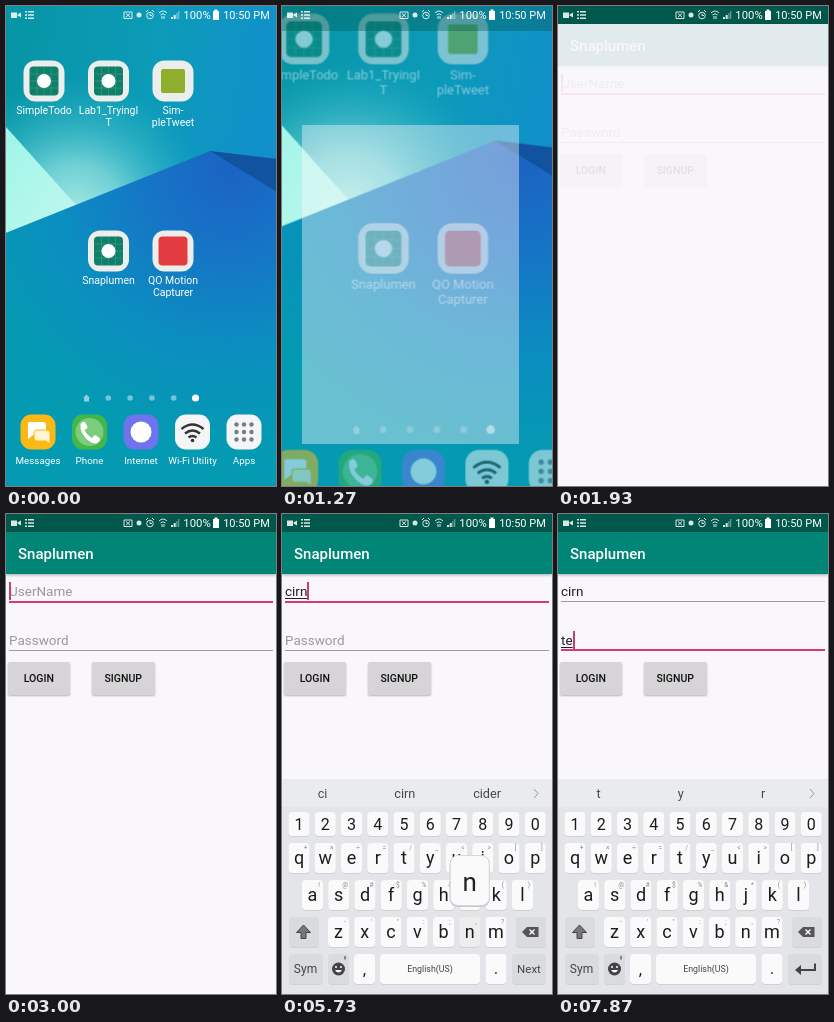
These frames come from a looping animation (270 px wide and 480 px high, 8 s). An HTML page:

```html
<!DOCTYPE html>
<html lang="en">
<head>
<meta charset="utf-8">
<title>Login</title>
<style>
html, body { margin: 0; width: 100%; height: 100%; overflow: hidden; }
#stage { position: relative; width: 270px; height: 480px; overflow: hidden; background: #0a95b2; font-family: Roboto, sans-serif; }
#stage > * { position: absolute; }
svg { left: 0; top: 0; width: 270px; height: 480px; display: block; }
svg text { text-anchor: middle; }
#wall, #icons { transform-origin: 107px 256px; animation: wall 8s linear infinite; }
#icons { animation-name: icons; }
@keyframes wall {
  0%, 12% { transform: none; }
  14.125% { transform: scale(1.02); }
  17.5% { transform: scale(1.16); }
  20%, 100% { transform: scale(1.24); }
}
@keyframes icons {
  0%, 11.4% { transform: none; opacity: 1; animation-timing-function: ease-in; }
  14.125% { transform: scale(1.058); opacity: .86; }
  17.5% { transform: scale(1.39); opacity: .18; }
  20%, 100% { transform: scale(1.56); opacity: 0; }
}
#win { background: #f9f7fa; animation: win 8s linear infinite; }
@keyframes win {
  0%, 13.3% { left: 60px; top: 225px; width: 90px; height: 90px; opacity: 0; }
  14.125% { left: 38px; top: 222px; width: 169px; height: 178px; opacity: .03; }
  17.5% { left: 3px; top: 25px; width: 262px; height: 448px; opacity: .75; }
  20.5%, 100% { left: 0; top: 18px; width: 270px; height: 462px; opacity: 1; }
}
#strip { left: 0; top: 0; width: 270px; background: #00574b; animation: strip 8s linear infinite; }
@keyframes strip {
  0%, 14.125% { height: 25px; opacity: 0; }
  17.5% { height: 25px; opacity: .7; }
  20.5%, 100% { height: 18px; opacity: 1; }
}
#form { left: 0; top: 0; width: 270px; height: 480px; animation: form 8s linear infinite; }
@keyframes form { 0%, 23.8% { opacity: 0; } 27.3%, 100% { opacity: 1; } }
#form > * { position: absolute; white-space: pre; }
#bar { left: 0; top: 18px; width: 258px; height: 42px; padding-left: 12px; background: #008577; color: #fff; font: 500 15px/44px Roboto, sans-serif; box-shadow: 0 1px 3px #0005; }
.field { left: 3px; font-size: 13.5px; line-height: 20px; color: #222; }
.hint { color: #9a989b; }
.line { left: 3px; width: 264px; height: 1px; background: #9b999c; }
.focus { height: 2px; background: #d63a72; }
.field u { text-underline-offset: 2px; text-decoration-thickness: 1px; }
.cur { display: inline-block; width: 2px; height: 18px; background: #c04272; vertical-align: -4px; }
.btn { top: 148px; width: 62.5px; height: 33px; border-radius: 2px; background: #d6d4d7; box-shadow: 0 1px 2px #0004; text-align: center; font: 500 10.5px/34px Roboto, sans-serif; color: #111; }
#keys { animation: keys 8s infinite; }
@keyframes keys {
  0%, 40% { transform: translateY(217px); animation-timing-function: cubic-bezier(.1, .6, .3, 1); }
  46.2%, 100% { transform: none; }
}
</style>
</head>
<body>
<div id="stage">
  <svg id="home" viewBox="0 0 270 480">
    <defs>
      <linearGradient id="sky" gradientUnits="userSpaceOnUse" x1="20" y1="60" x2="270" y2="100"><stop stop-color="#0796a8"/><stop offset=".5" stop-color="#0c9bb8"/><stop offset="1" stop-color="#1190cc"/></linearGradient>
      <radialGradient id="glow" gradientUnits="userSpaceOnUse" cx="70" cy="205" r="135"><stop stop-color="#a5e8e2"/><stop offset=".35" stop-color="#79d6d8" stop-opacity=".9"/><stop offset="1" stop-color="#1fb0c4" stop-opacity="0"/></radialGradient>
      <radialGradient id="sea" gradientUnits="userSpaceOnUse" cx="225" cy="165" r="270"><stop stop-color="#1b63c2"/><stop offset=".3" stop-color="#1674c6"/><stop offset=".65" stop-color="#0b8ec0"/><stop offset="1" stop-color="#049ab2"/></radialGradient>
      <linearGradient id="mint" x2="1" y2="1"><stop stop-color="#8ff0e4"/><stop offset=".5" stop-color="#a9f6ea"/><stop offset="1" stop-color="#c4f6ee"/></linearGradient>
    </defs>
    <g id="wall">
      <path fill="url(#sky)" d="M-60-60H330V260H-60z"/>
      <path fill="url(#glow)" d="M-60-60H330V260H-60z"/>
      <path fill="url(#mint)" d="M-40 77L0 121 70 199 0 227-40 243z"/>
      <path fill="url(#sea)" d="M-60 251L204 145 330 160V560H-60z"/>
      <path fill="#12539f" d="M204 145L330 160V222z"/>
    </g>
    <g id="icons"></g>
  </svg>
  <div id="win"></div>
  <div id="strip"></div>
  <div id="form">
    <div id="bar">Snaplumen</div>
    <div class="line" style="top:87px"></div>
    <div class="line" style="top:136px"></div>
    <div class="btn" style="left:1.5px">LOGIN</div>
    <div class="btn" style="left:86px">SIGNUP</div>
  </div>
  <svg viewBox="0 0 270 480"><g id="keys"></g></svg>
  <svg id="status" viewBox="0 0 270 480" fill="#fff">
    <g opacity=".85">
      <path d="M5 6.500h6v5.500H5zM11.500 8.500L15 6.500v5L11.500 9.500zM19 5h2v1.500h-2zm3 0h6v1.500h-6zm-3 3.300h2v1.500h-2zm3 0h6v1.500h-6zm-3 3.300h2v1.500h-2zm3 0h6v1.500h-6z"/>
      <g fill="none" stroke="#fff">
        <path d="M118 6h8v6.500h-8zM120 7.500l4 3.500m0-3.500l-4 3.500"/>
        <circle cx="144" cy="9.500" r="3.300"/><path d="M144 7.500v2h2M140 6l2-2m4 0l2 2"/>
        <path d="M153 7q4-4 8 0m-6.500 2q2.500-2.500 5 0M156 13v-3m2 0v3"/>
      </g>
      <circle cx="133" cy="9" r="2.500"/>
      <path d="M165 13h2v-2h-2zm2.700 0h2v-4h-2z"/><path opacity=".5" d="M170.300 13h1.200V7h-1.200zm1.800 0h1.200V5h-1.200z"/>
    </g>
    <path d="M207 5h1.500V3.500h3V5h1.500v9h-6z"/>
    <g font-size="11.300"><text x="191" y="13">100%</text><text x="240.500" y="13" font-size="11">10:50 PM</text></g>
  </svg>
</div>
<script>
const $ = id => document.getElementById(id);
const sheet = document.head.appendChild(document.createElement('style'));
let count = 0;

// Makes an element visible only during the given [from, to] spans in ms.
function show(el, ...spans) {
  const name = 'on' + count++;
  const steps = spans.map(([a, b]) => `${a / 80}%{visibility:visible}${b / 80}%{visibility:hidden}`);
  sheet.append(`@keyframes ${name}{0%{visibility:hidden}${steps.join('')}}`);
  el.style.animation = `${name} 8s step-end infinite`;
}
function add(parent, markup, ...spans) {
  parent.insertAdjacentHTML('beforeend', markup);
  if (spans.length) show(parent.lastElementChild, ...spans);
}
const text = (x, y, size, s, more = '') => `<text x="${x}" y="${y}" font-size="${size}" ${more}>${s}</text>`;
const rect = (x, y, w, h, r, fill, more = '') => `<rect x="${x}" y="${y}" width="${w}" height="${h}" rx="${r}" fill="${fill}" ${more}/>`;

// Home screen
const home = $('icons');
function icon(x, y, frame, art, size, gap, label) {
  const lines = label.map((s, i) => text(0, gap + i * 12, size, s, 'fill="#fff"')).join('');
  add(home, `<g transform="translate(${x} ${y})">${frame}${art}${lines}</g>`);
}
const frame = rect(-20.5, -20.5, 41, 41, 12, '#eceeec');
const tile = fill => rect(-14.5, -14.5, 29, 29, 4, fill);
const app = (x, y, art, ...label) => icon(x, y, frame, art, 10.5, 33, label);
const dock = (x, fill, art, label) => icon(x, 426, rect(-17.5, -17.5, 35, 35, 11, fill), art, 9.8, 31.5, [label]);

const grid = tile('#0f7f69') + '<path d="M-14-7h28m-28 7h28m-28 7h28M-7-14v28m7-28v28m7-28v28" stroke="#3aa28c" stroke-width=".6"/><circle r="7" fill="#fff"/>';
app(38, 75, grid, 'SimpleTodo');
app(102.5, 75, grid, 'Lab1_TryingI', 'T');
app(167, 75, rect(-12, -12, 24, 24, 2, '#8fae2c'), 'Sim-', 'pleTweet');
app(102.5, 245, grid, 'Snaplumen');
app(167, 245, tile('#e23c40'), 'QO Motion', 'Capturer');
dock(32, '#fdb913', '<path fill="#fff" d="M-9-10H5q3 0 3 3v7q0 3-3 3H-5l-5 4V-7q0-3 1-3z"/><path fill="#fff3d0" stroke="#fdb913" d="M-1-2h10q3 0 3 3v11l-4-3h-9q-3 0-3-3v-5q0-3 3-3z"/>', 'Messages');
dock(83.5, '#42b649', '<circle r="14" fill="#79cd7c"/><path fill="#fff" d="M-9-8q3-4 5-1l2 4q0 2-3 3 3 6 8 8 1-3 3-3l4 3q2 2-2 5-4 2-11-4-7-7-6-15z"/>', 'Phone');
dock(135, '#6f73ec', '<circle r="10.500" fill="#fff"/>', 'Internet');
dock(186.5, '#f4f5f6', '<path d="M-11-3q11-9 22 0M-7.500 1.500q7.500-6 15 0M-4 5.500q4-3 8 0" fill="none" stroke="#333" stroke-width="2.300"/><circle cy="8.500" r="1.800" fill="#333"/>', 'Wi-Fi Utility');
let dots = '';
for (let i = 0; i < 9; i++) dots += `<circle cx="${(i % 3 - 1) * 7.5}" cy="${(Math.floor(i / 3) - 1) * 7.5}" r="2.2" fill="#777b80"/>`;
dock(238, '#f4f5f6', dots, 'Apps');
add(home, '<path fill="#8fd0de" d="M77 392l3.500-3.500 3.500 3.500h-1v3.500h-5V392z"/>');
for (let i = 1; i < 6; i++) add(home, `<circle cx="${80.5 + i * 21.8}" cy="392" r="${i < 5 ? 2.8 : 3.5}" fill="${i < 5 ? '#79c3da' : '#fff'}"/>`);

// Form
const form = $('form'), cur = '<i class="cur"></i>';
const field = (top, body, cls, ...spans) => add(form, `<div class="field ${cls}" style="top:${top}px">${body}</div>`, ...spans);
add(form, '<div class="line focus" style="top:87px"></div>', [0, 6270]);
add(form, '<div class="line focus" style="top:135px"></div>', [6270, 8000]);
field(67, 'UserName', 'hint', [0, 4670]);
field(116, 'Password', 'hint', [0, 7400]);
field(67, cur, '', [0, 2670], [3000, 3300], [3730, 4200], [4600, 4670]);
field(116, cur, '', [6270, 6870], [7270, 7400]);
const typed = (top, s, from, to) => field(top, `<u>${s}</u>${cur}`, '', [from, to]);
typed(67, 'c', 4670, 5070);
typed(67, 'ci', 5070, 5470);
typed(67, 'cir', 5470, 5720);
typed(67, 'cirn', 5720, 6270);
field(67, 'cirn', '', [6270, 8000]);
typed(116, 't', 7400, 7800);
typed(116, 'te', 7800, 8000);

// Keyboard
const keys = $('keys'), spot = {}, grey = '#d9dbdf';
const key = (x, y, w, h, fill = '#fafafb') => add(keys, rect(x, y + 1, w, h, 4, '#ced1d5') + rect(x, y, w, h, 4, fill));
add(keys, rect(0, 265, 270, 215, 0, '#e3e5e9') + rect(0, 265, 270, 28, 0, '#e9ebee'));
add(keys, '<path d="M252 275l4 4.500-4 4.500" fill="none" stroke="#999"/>');
function row(letters, hints, x, y, h, size) {
  [...letters].forEach((c, i) => {
    const cx = x + i * 26.25;
    spot[c] = [cx, y];
    key(cx - 10.5, y - h / 2, 21, h);
    add(keys, text(cx, y + size * .36, size, c, 'fill="#1c1c1e"'));
    if (hints[i]) add(keys, text(cx + 6.5, y - 8.5, 6.5, hints[i], 'fill="#888"'));
  });
}
row('1234567890', '', 17, 310, 24, 16);
row('qwertyuiop', ['+', '×', '÷', '=', '/', '_', '&lt;', '&gt;', '[', ']'], 17, 344, 30, 18);
row('asdfghjkl', ['!', '@', '#', '$', '%', '&amp;', '*', '(', ')'], 30.5, 381, 30, 18);
row('zxcvbnm', `-'":;,?`, 56.5, 418, 30, 18);
key(7, 403, 30, 30, grey);
key(234, 403, 30, 30, grey);
key(7, 440, 34, 30, grey);
key(46, 440, 21, 30, grey);
key(72, 440, 21, 30);
key(98, 440, 100, 30);
key(203.5, 440, 21, 30);
key(230, 440, 34, 30, grey);
add(keys, '<path d="M21.500 411l-7 7.500h4.500v6h5v-6h4.500z" fill="#777" stroke="#444"/>');
add(keys, '<path d="M240 418l5-5h11.500v10H245z" fill="#555"/><path d="M247.500 415.500l5 5m0-5l-5 5" stroke="#fff" stroke-width="1.300"/>');
add(keys, text(23.5, 459, 12, 'Sym', 'fill="#444"') + text(82.5, 461, 17, ',', 'fill="#222"') + text(214, 460, 17, '.', 'fill="#222"') + text(148, 458, 8.8, 'English(US)', 'fill="#444"'));
add(keys, '<circle cx="56.500" cy="455" r="6.500" fill="#444"/><path d="M53 456q3.500 5 7 0z" fill="#fff"/><circle cx="54" cy="453" r="1" fill="#fff"/><circle cx="59" cy="453" r="1" fill="#fff"/><path d="M62 442h2v3.500h-2z" fill="#888"/>');
add(keys, text(247, 459, 11.5, 'Next', 'fill="#444"'), [0, 6670]);
add(keys, '<path d="M256 449.500v5.500h-13v-4l-6 5 6 5v-4h15v-7.500z" fill="#444"/>', [6670, 8000]);

// Word suggestions
function words(list, ...spans) {
  const body = list.map((s, i) => text(40.5 + i * 82.3, 284, 12.7, s, 'fill="#46484c"')).join('');
  add(keys, `<g>${body}</g>`, ...spans);
}
words(['test', 'fernit', 'cirn'], [0, 4730], [6900, 7800]);
words(['c', 'v', 'x'], [4730, 5300]);
words(['ci', 'cirn', 'cider'], [5300, 5870]);
words(['cirn', 'circle', 'corn'], [5870, 6900]);
words(['t', 'y', 'r'], [7800, 8000]);

// Key presses
function press(c, from, to) {
  const [x, y] = spot[c];
  const down = rect(x - 10.5, y - 15, 21, 30, 4, '#0000000d');
  const bubble = rect(x - 20, y - 76, 40, 51, 8, '#c4c6ca') + rect(x - 19.5, y - 76.5, 39, 50, 8, '#fafafb', 'stroke="#d6d8dc"');
  add(keys, `<g>${down}${bubble}${text(x, y - 41, 26, c, 'fill="#222"')}</g>`, [from, to]);
}
press('c', 4530, 4730);
press('i', 4930, 5120);
press('r', 5270, 5470);
press('n', 5600, 5870);
press('t', 7270, 7460);
press('e', 7670, 7860);
</script>
</body>
</html>
```
